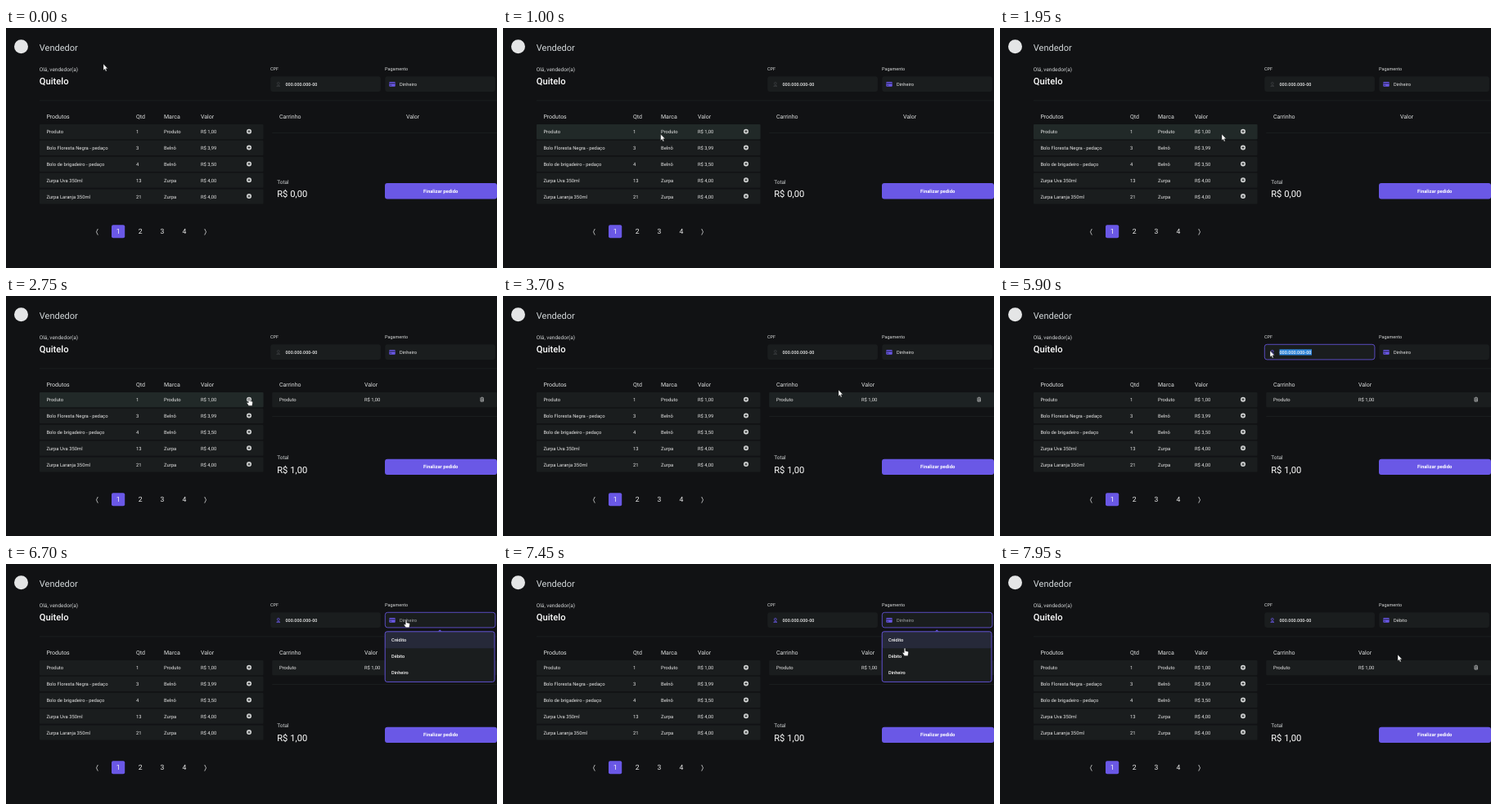
Recreate the animation shown at these times as an HTML page. Size 600x294 px, loop 8000 ms.

```html
<!DOCTYPE html>
<html lang="pt-BR">
<head>
<meta charset="utf-8">
<title>Vendedor</title>
<style>
  html, body { margin: 0; width: 100%; height: 100%; overflow: hidden; background: #111214; }
  svg { display: block; width: 600px; height: 294px; font-family: Roboto, sans-serif; text-rendering: geometricPrecision; }
</style>
</head>
<body>
<svg id="stage" viewBox="0 0 600 294"></svg>
<script>
const LOOP = 8000, ADD = 2600, FOCUS = 5200, DRAG_END = 5700, OPEN = 6700, PICK = 7720;
const PURPLE = '#6a58e6', PANEL = '#1a1d1e', HOVER = '#212928', LINE = '#1d2021';
const stage = document.getElementById('stage');

function el(tag, attrs, parent = stage) {
  const node = document.createElementNS('http://www.w3.org/2000/svg', tag);
  for (const key in attrs) node.setAttribute(key, attrs[key]);
  parent.appendChild(node);
  return node;
}
const group = (parent = stage) => el('g', {}, parent);
const rect = (x, y, width, height, fill, rx = 0, parent = stage) =>
  el('rect', { x, y, width, height, fill, rx }, parent);
const path = (d, attrs, parent = stage) => el('path', { d, fill: 'none', ...attrs }, parent);

// Text placed by the middle of its capitals.
function text(value, x, middle, size, fill = '#e6e6e6', parent = stage, extra = {}) {
  const node = el('text', { x, y: middle + size * 0.355, 'font-size': size, fill, ...extra }, parent);
  node.textContent = value;
  return node;
}
const show = (node, visible) => node.setAttribute('visibility', visible ? 'visible' : 'hidden');

// Page head
el('circle', { cx: 18.5, cy: 22.8, r: 8.5, fill: '#e4e5e6' });
text('Vendedor', 40.8, 23.6, 11, '#d3d8da');
text('Olá, vendedor(a)', 40.8, 50.8, 6.5, '#d0d3d4');
text('Quitelo', 40.8, 65.2, 11.2, '#ffffff', stage, { 'font-weight': 500 });
rect(41, 88.5, 559, 0.8, LINE);

// Fields
function field(x, label) {
  text(label, x, 50, 5.5, '#d8dada');
  return el('rect', { x: x + 0.3, y: 59.3, width: 134.6, height: 18.6, rx: 3, fill: PANEL, 'stroke-width': 0.8 });
}
const cpfBox = field(323, 'CPF');
const payBox = field(463, 'Pagamento');
const userIcon = path('M331.4 67.8a1.4 1.4 0 1 0 2.8 0a1.4 1.4 0 1 0 -2.8 0M330.7 71.3q2.1 -2.4 4.2 0z',
  { 'stroke-width': 0.8 });
const selection = rect(341.5, 65.3, 39.5, 7.2, '#2f86dc');
text('000.000.000-00', 341.5, 68.8, 5.45, '#eeeeee', stage, { 'font-weight': 500 });
rect(468.3, 66, 7.4, 5.8, PURPLE, 0.8);
rect(468.3, 67.3, 7.4, 1.1, '#25214a');
rect(469.2, 69.7, 2, 0.8, '#25214a');
const payText = text('', 481, 68.6, 5.7);

// Products
const columns = [49.4, 159, 193, 238];
['Produtos', 'Qtd', 'Marca', 'Valor'].forEach((name, i) => text(name, columns[i], 108.8, 7, '#dfe1e1'));
const products = [
  ['Produto', 1, 'Produto', 'R$ 1,00'],
  ['Bolo Floresta Negra - pedaço', 3, 'Belnô', 'R$ 3,99'],
  ['Bolo de brigadeiro - pedaço', 4, 'Belnô', 'R$ 3,50'],
  ['Zurpa Uva 350ml', 13, 'Zurpa', 'R$ 4,00'],
  ['Zurpa Laranja 350ml', 21, 'Zurpa', 'R$ 4,00']
];
const rows = [];
function row(x, y, width, parent = stage) {
  rect(x, y, width, 18.2, PANEL, 1, parent);
  const glow = rect(x, y, width, 18.2, HOVER, 1, parent);
  rows.push({ x, y, width, glow });
}
products.forEach((cells, i) => {
  const y = 118 + i * 19.85;
  row(41, y, 273.5);
  cells.forEach((cell, c) => text(cell, columns[c], y + 9.2, 5.85));
  el('circle', { cx: 297, cy: y + 8.7, r: 3, fill: '#d4d6d6' });
  path(`M295.4 ${y + 8.7}h3.2M297 ${y + 7.1}v3.2`, { stroke: PANEL, 'stroke-width': 0.8 });
});

// Pagination
rect(129, 241.2, 16.2, 16, PURPLE, 2);
[1, 2, 3, 4].forEach((n, i) =>
  text(n, 137.2 + i * 26.9, 249.4, 8.6, '#f0f0f0', stage, { 'text-anchor': 'middle' }));
path('M112.3 246l-1.8 3.8l1.8 3.8M242.7 246l1.8 3.8l-1.8 3.8', { stroke: '#d8dada', 'stroke-width': 0.8 });

// Cart
text('Carrinho', 334, 108.8, 7, '#dfe1e1');
const cartValue = text('Valor', 489, 108.8, 7, '#dfe1e1');
const cartRow = group();
row(325.3, 118, 274.7, cartRow);
text('Produto', 334, 127.2, 5.85, '#e6e6e6', cartRow);
text('R$ 1,00', 438, 127.2, 5.85, '#e6e6e6', cartRow);
path('M579.4 125h4.6M580.9 124.2h1.6M580 125.5v3.6h3.4v-3.6M581.1 126.3v2M582.3 126.3v2',
  { stroke: '#d4d6d6', 'stroke-width': 0.7 }, cartRow);
const cartLine = rect(325.3, 128, 274.7, 0.8, LINE);
const summary = group();
text('Total', 331.2, 188.2, 6.5, '#d0d3d4', summary);
const total = text('', 331.2, 203, 11.2, '#ffffff', summary);
rect(463, 190, 137, 19.4, PURPLE, 3, summary);
text('Finalizar pedido', 531.2, 199.7, 5.9, '#ffffff', summary, { 'font-weight': 700, 'text-anchor': 'middle' });

// Payment menu
const menu = group();
path('M527.6 82.8l2.6 -2.4l2.6 2.4z', { fill: PURPLE }, menu);
rect(463.2, 82.8, 133.8, 61.6, PANEL, 2.5, menu);
const optionGlow = rect(463.2, 82.8, 133.8, 20.4, '#262939', 2, menu);
['Crédito', 'Débito', 'Dinheiro'].forEach((name, i) =>
  text(name, 471, 93 + i * 20.2, 5.6, '#f4f4f4', menu, { 'font-weight': 500 }));
el('rect', { x: 463.2, y: 82.8, width: 133.8, height: 61.6, rx: 2.5, fill: 'none', stroke: PURPLE, 'stroke-width': 0.9 }, menu);

// Pointers, with the hot spot at the origin
const pointer = group();
const outline = { fill: '#ffffff', stroke: '#111214', 'stroke-width': 0.4, 'stroke-linejoin': 'round' };
const shapes = {
  arrow: path('M0 0V7.8L1.7 6.2L2.9 9L4.2 8.4L3 5.7H5.4Z', outline, pointer),
  hand: path('M-.8 .6Q0 -.7 .8 .6V3.5L3.8 4.2Q4.6 4.5 4.4 5.6L3.8 9.4H-.4L-2.6 6.3Q-2.8 5 -1.6 5.4L-.8 6.1Z', outline, pointer),
  beam: path('M-1.3 -4h2.6M0 -4v8M-1.3 4h2.6', { stroke: '#dddddd', 'stroke-width': 0.7 }, pointer)
};

// time, x, y
const route = [
  [0, 119, 44], [700, 160, 118], [1300, 225, 142], [1950, 271, 130], [2400, 297, 125],
  [2850, 297, 125], [3450, 386, 128], [3700, 410, 115], [4300, 484, 70], [4550, 489, 68],
  [4750, 489, 68], [FOCUS - 50, 384, 68], [FOCUS, 384, 68], [DRAG_END, 330, 67], [6050, 330, 67],
  [6550, 489, 68], [6900, 489, 69], [7450, 491, 103], [7680, 487, 112], [7950, 486, 111], [LOOP, 486, 111]
];
function cursorAt(t) {
  const i = Math.max(1, route.findIndex(stop => stop[0] >= t));
  const [t0, x0, y0] = route[i - 1], [t1, x1, y1] = route[i];
  const u = Math.min(1, Math.max(0, (t - t0) / (t1 - t0)));
  const ease = u * u * (3 - 2 * u);
  return { x: x0 + (x1 - x0) * ease, y: y0 + (y1 - y0) * ease };
}
const inside = (p, x, y, w, h) => p.x >= x && p.x <= x + w && p.y >= y && p.y <= y + h;
const isOpen = t => t >= OPEN && t < PICK;

// Share of the last moments spent over a row gives a fading highlight.
function hoverAmount(r, t) {
  let hits = 0;
  for (let k = 0; k < 8; k++) {
    const s = Math.max(0, t - k * 25);
    if (!isOpen(s) && inside(cursorAt(s), r.x, r.y, r.width, 18.2)) hits++;
  }
  return hits / 8;
}

function draw(t) {
  const p = cursorAt(t), added = t >= ADD, open = isOpen(t);
  const focused = t >= FOCUS && t < OPEN;

  rows.forEach(r => r.glow.setAttribute('opacity', hoverAmount(r, t)));
  show(cartRow, added);
  cartRow.setAttribute('display', added ? 'inline' : 'none');
  cartValue.setAttribute('x', added ? 438 : 489);
  cartLine.setAttribute('y', added ? 147.2 : 128);
  summary.setAttribute('transform', `translate(0 ${added ? 9.7 : 0})`);
  total.textContent = added ? 'R$ 1,00' : 'R$ 0,00';

  cpfBox.setAttribute('stroke', focused ? PURPLE : 'none');
  payBox.setAttribute('stroke', open ? PURPLE : 'none');
  userIcon.setAttribute('stroke', t >= FOCUS ? PURPLE : '#3b3e41');
  const left = Math.min(381, Math.max(341.5, p.x));
  const start = t > DRAG_END ? 341.5 : left;
  show(selection, focused);
  selection.setAttribute('x', start);
  selection.setAttribute('width', 381 - start);

  payText.textContent = t >= PICK ? 'Débito' : 'Dinheiro';
  payText.setAttribute('fill', open ? '#a2a5a7' : '#e6e6e6');
  show(menu, open);
  const option = Math.min(2, Math.max(0, Math.floor((p.y - 83.2) / 20.2)));
  optionGlow.setAttribute('y', 82.8 + option * 20.4);

  const overPlus = Math.abs(p.x - 297) < 5 && Math.abs((p.y - 126.7) % 19.85) < 5;
  const overPay = inside(p, 463, 59, 135, 19) || (open && inside(p, 463, 83, 134, 61));
  const kind = overPlus || overPay ? 'hand' : inside(p, 338, 59, 120, 19) ? 'beam' : 'arrow';
  for (const name in shapes) show(shapes[name], name === kind);
  pointer.setAttribute('transform', `translate(${p.x} ${p.y})`);
}

const begin = performance.now();
function tick() {
  draw((performance.now() - begin) % LOOP);
  requestAnimationFrame(tick);
}
tick();
</script>
</body>
</html>
```
